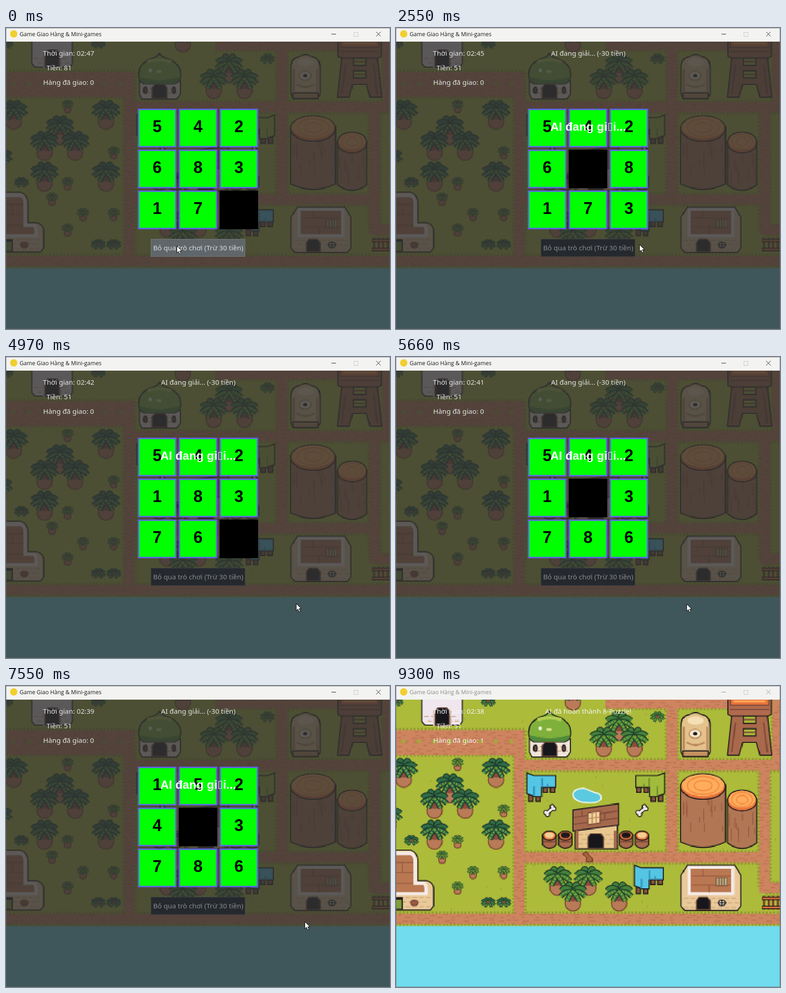
Animation of 846x662 px, one loop 9.32 s. Source, as an HTML page with a canvas:

```html
<!DOCTYPE html>
<html lang="vi">
<head>
<meta charset="utf-8">
<style>
html, body { margin: 0; width: 100%; height: 100%; overflow: hidden; }
canvas { display: block; }
</style>
</head>
<body>
<canvas id="stage" width="846" height="662"></canvas>
<script>
const LOOP = 9320, PIXEL = 2.115, TOP = 30, TILE = 33.9;
const INK = '#1b171b', DARK = '#17171b', BROWN = '#a9694b', PLANK = '#7d4938';
const ctx = document.getElementById('stage').getContext('2d');

// ---- Village map, painted small and enlarged for chunky pixels ----
const map = document.createElement('canvas');
map.width = 400;
map.height = 299;
const g = map.getContext('2d');
g.setTransform(1 / PIXEL, 0, 0, 1 / PIXEL, 0, -TOP / PIXEL);

let seed = 7;
const random = () => (seed = seed * 16807 % 2147483647) / 2147483647;

function shape(d, fill, ink = INK, width = 2.4) {
  const path = new Path2D(d);
  if (fill) { g.fillStyle = fill; g.fill(path); }
  if (ink) { g.strokeStyle = ink; g.lineWidth = width; g.stroke(path); }
}
function rect(fill, x, y, w, h) {
  g.fillStyle = fill;
  g.fillRect(x, y, w, h);
}
function oval(fill, x, y, rx, ry, ink) {
  g.beginPath();
  g.ellipse(x, y, rx, ry, 0, 0, 7);
  if (fill) { g.fillStyle = fill; g.fill(); }
  if (ink) { g.strokeStyle = ink; g.lineWidth = 2.4; g.stroke(); }
}

function ground() {
  const roads = 'M272 98V525M272 174H860M608 38V377M272 377H812M812 174V444H860M-9 512H860M462 38H740M841 20V174';
  const avenue = 'M-9 124H283';
  shape(roads, null, '#cd845f', 23);
  shape(avenue, null, '#cd845f', 55);
  g.globalCompositeOperation = 'source-atop';
  for (let y = 34; y < 528; y += 6)
    for (let x = random() * 20; x < 846; x += 14 + random() * 22)
      rect('#b97050', x, y + (random() < .5 ? 0 : 2), 6 + random() * 8, 2);
  g.globalCompositeOperation = 'destination-over';
  g.setLineDash([4, 4]);
  shape(roads, null, '#8f962f', 31);
  shape(avenue, null, '#8f962f', 63);
  g.setLineDash([]);
  for (let n = 0; n < 110; n++)
    rect(n % 2 ? '#97a52f' : '#bfae3c', random() * 846, 35 + random() * 485, 2, 5);
  rect('#acbb3a', 0, TOP, 846, 640);
  g.globalCompositeOperation = 'source-over';
  rect('#70dcee', 0, 528, 846, 140);
  for (let x = 16; x < 260; x += 34) shape(`M${x - 6} 122l6 -6l6 6l-6 6z`, '#a3aa38', null);
}

// P: palm, s: sprout, x: fallen leaves
const GARDEN = `
............P
x.....x
...............P.x
..............P.P

.P..s..P
....P
...P.P
P......s
...P...P
.x..s
...s
.....s.s...P.P
....s.......P..P
......xx`;

function plant(x, y, size, green, trunk) {
  if (trunk) {
    oval('#b97b57', x, y + 48 * size, 17 * size, 17 * size, '#7d4632');
    oval('#8f4b3c', x, y + 38 * size, 13 * size, 6 * size);
  }
  for (let i = 0; i < 8; i++) {
    const angle = -Math.PI / 2 + (i >> 1) * .75 + .4, side = i % 2 ? 1 : -1;
    const dx = side * 29 * Math.cos(angle) * size, dy = (18 * Math.sin(angle) + 5) * size;
    const frond = `M${x} ${y + 22 * size}q${dx * .6} ${dy - 13 * size} ${dx} ${dy}`;
    shape(frond, null, '#1d3329', 12 * size);
    shape(frond, null, green, 8 * size);
    g.setLineDash([3, 4]);
    if (i > 3) shape(frond, null, '#8fb13c', 4 * size);
    g.setLineDash([]);
  }
  if (!trunk) oval('#8a4a38', x, y + 22 * size, 4, 3);
}

function garden() {
  GARDEN.split('\n').slice(1).forEach((row, r) => [...row].forEach((kind, c) => {
    const y = 34 * r - 12, green = c < 9 ? '#2f6b45' : '#42803a';
    if (kind === 'P') plant(TILE * (c - .5), y, 1, green, true);
    if (kind === 's') plant(TILE * c, y, .43, '#5f9038', true);
    if (kind === 'x') plant(TILE * c, y, .52, green, false);
  }));
}

function doorway(x, y, w, h) {
  shape(`M${x} ${y + h}v${8 - h}l6 -8h${w - 12}l6 8v${h - 8}z`, DARK, '#6b4636');
}

function bricks(x, y, w, h) {
  for (let row = 0; row * 10 < h; row++)
    for (let i = row % 2 * 7; i < w - 5; i += 15) rect('#cda476', x + i, y + row * 10, 10, 2);
}

function stump(x, y, w, ry, bottom) {
  const rx = w / 2, cx = x + rx;
  shape(`M${x} ${y}V${bottom - 12}Q${cx} ${bottom + 12} ${x + w} ${bottom - 12}V${y}Z`, '#b17754');
  for (let i = 0; i < w / 7; i++)
    rect('#96593f', x + 3 + random() * (w - 8), y + ry + random() * (bottom - y - ry - 40), 2, 8 + random() * 22);
  oval('#e8743c', cx, y + 2, rx, ry, INK);
  oval('#ffad5a', cx, y - 1, rx - 3, ry - 4);
  for (const s of [.7, .4]) oval(null, cx, y, rx * s, ry * s, '#ef8744');
}

function barrel(x, inside) {
  shape(`M${x - 15} 328V350Q${x} 364 ${x + 15} 350V328Z`, BROWN);
  rect(PLANK, x - 14, 341, 28, 3);
  oval('#e8743c', x, 329, 15, 10, INK);
  oval(inside, x, 328, 10, 6);
}

function tarp(x, y, side, color, shade) {
  g.save();
  g.translate(x, y);
  g.scale(side, 1);
  for (let leg = 4; leg < 60; leg += 16) shape(`M${leg} 28h10v${leg < 30 ? 35 : 15}h-10z`, '#8a5540');
  shape('M0 0L16 6H64V32H33V52H18L0 46Z', color);
  shape('M16 30V50M34 12V32M46 24V32', null, shade, 3);
  g.restore();
}

function bone(x, y) {
  for (const [color, grow] of [[INK, 2], ['#f4eee8', 0]]) {
    shape(`M${x - 7} ${y + 7}L${x + 7} ${y - 6}`, null, color, 5 + 2 * grow);
    for (const s of [-1, 1]) {
      oval(color, x + 9 * s, y - 4 * s, 3.5 + grow, 3.5 + grow);
      oval(color, x + 5 * s, y - 9 * s, 3.5 + grow, 3.5 + grow);
    }
  }
}

function whiteTower() {
  shape('M57 20V78L64 86H140L146 78V20Z', '#f0e6ee');
  bricks(62, 66, 80, 20);
  shape('M82 88V54Q102 38 122 54V88', '#d9c8bc', null);
  doorway(86, 48, 32, 39);
}

function domeHut() {
  shape('M294 116H384V146L376 156H300L294 146Z', '#f0e4d8');
  bricks(302, 132, 76, 20);
  shape('M292 104Q292 78 318 68Q332 64 338 56Q344 64 358 68Q385 78 385 104Q385 118 372 123H304Q292 118 292 104Z', '#7fb03c');
  shape('M294 108Q338 122 383 108Q382 122 366 122H308Q296 122 294 108Z', '#4f8a3a', null);
  shape('M312 74Q338 66 364 74', null, '#b5cf50', 7);
  oval('#f6fbe6', 318, 93, 4, 4);
  oval('#d7e38a', 337, 96, 6, 3);
  doorway(322, 124, 33, 30);
  for (const x of [307, 370]) oval('#6b4636', x, 137, 4, 7, INK);
}

function statue() {
  shape('M628 92Q626 66 646 63Q660 54 674 63Q694 66 692 92V146L686 155H634L628 146Z', '#e4c28c');
  shape('M634 90V140M686 90V140M640 124Q660 136 680 124', null, '#b98658', 4);
  oval('#f5dfb4', 660, 76, 18, 9);
  oval('#f8ead0', 659, 105, 13, 10, '#b98658');
  oval(INK, 659, 105, 5, 4);
  shape('M632 143H688V155H632Z', '#c4915f');
}

function watchTower() {
  shape('M740 64L730 152H756L764 124H794L802 152H828L818 64Z', BROWN);
  shape('M765 66H793V82H765ZM765 94H793V110H765Z', '#acbb3a');
  shape('M748 80L740 146M810 80L818 146M765 74H793M765 102H793', null, PLANK, 3);
  shape('M731 20H827V62L820 66H738L731 62Z', '#b06a4c');
  shape('M737 20H821V42H737Z', '#e8743c', PLANK);
  rect('#ffad5a', 744, 32, 70, 4);
  shape('M736 52H822', null, PLANK, 3);
}

function yard() {
  shape('M395 300H488V358H395Z', '#e9c78f');
  bricks(402, 326, 82, 30);
  shape('M390 273L490 259V306L390 319Z', '#a4694c');
  shape('M392 289L488 275M392 304L488 291M410 272V286M460 280V292', null, PLANK);
  shape('M423 279L450 275V301L423 305Z', '#f0d29b', PLANK);
  shape('M432 278V303M441 277V302M423 292L450 288', null, '#b98658', 2);
  for (const x of [395, 480]) rect('#a4694c', x, 318, 7, 39);
  doorway(423, 325, 34, 32);
  for (const x of [338, 542]) barrel(x, '#f3cf94');
  for (const x of [373, 507]) barrel(x, INK);
  shape('M390 238Q392 224 414 225Q428 230 436 234Q454 236 452 248Q448 258 424 257Q392 256 390 238Z', '#5bc9e0', '#eef4ee', 3);
  for (const x of [339, 542]) bone(x, 274);
  tarp(288, 191, 1, '#55c5e4', '#2f8fb8');
  tarp(592, 191, -1, '#a3bb3c', '#66892f');
  tarp(525, 394, 1, '#55c5e4', '#2f8fb8');
}

function clayHouse(wall, roof, planks) {
  shape(wall, '#e9c99a');
  shape(roof, '#b97852', '#f5ece8', 7);
  shape(planks, null, '#96593f', 2);
}

function clayHouses() {
  clayHouse('M628 416L642 394H746L760 416V484L752 494H636L628 484Z', 'M646 399H742V457H646Z',
    'M652 418H738M652 438H738M676 403V418M690 438V454');
  bricks(634, 466, 120, 26);
  doorway(662, 464, 30, 28);
  rect('#8a5a40', 704, 421, 26, 20);
  for (let x = 707; x < 728; x += 6) rect('#b6bc92', x, 423, 3, 15);
  oval('#d8d8c0', 718, 477, 8, 6, INK);
  shape('M718 471V483M710 477H726', null, INK, 2);

  clayHouse('M-6 361H32Q48 366 48 384V428H68Q83 432 83 446V484L76 493H-6Z',
    'M-9 368H32Q42 372 42 384V434H62Q68 438 66 457H-9Z', 'M0 388H38M0 410H38M0 434H38M14 388V410');
  bricks(6, 464, 72, 28);
  rect(INK, 0, 464, 15, 28);
  rect('#7fa038', 0, 470, 12, 20);
  oval('#96593f', 40, 477, 8, 6, PLANK);
}

function ladder() {
  for (let x = 811; x < 846; x += 10) shape(`M${x} 462v30`, null, '#7d3d2c', 5);
  shape('M806 467H850M806 487H850', null, INK, 8);
  shape('M807 467H850M807 487H850', null, '#e8743c', 4);
}

function paintMap() {
  ground();
  garden();
  whiteTower();
  domeHut();
  statue();
  watchTower();
  stump(627, 219, 99, 28, 355);
  stump(730, 250, 65, 23, 357);
  yard();
  clayHouses();
  ladder();
  shape('M412 370L415 366H422L424 371Q434 376 433 387H419L420 377Z', '#a8643c', '#5e3524', 2);
}

// ---- Timeline ----
const CLICK = 1220, SOLVE = 2150, MOVE = 390, DONE = 8880, BLUR = 9300;
const START = '542683170', PATH = 'ULLDRURDLUULDRURDD';
const STEP = { U: -3, D: 3, L: -1, R: 1 };
// Resting points of the pointer: time, x, y
const REST = [
  [0, 376, 479], [1220, 377, 483], [1760, 536, 476], [3600, 536, 476], [3870, 539, 465],
  [4500, 539, 465], [4970, 639, 542], [6060, 641, 543], [6600, 657, 520], [7550, 658, 518], [8250, 805, 700]
];

function boardAt(t) {
  const board = [...START];
  let blank = board.indexOf('0');
  for (const move of PATH.slice(0, Math.max(0, Math.floor((t - SOLVE) / MOVE) + 1))) {
    const next = blank + STEP[move];
    [board[blank], board[next]] = [board[next], '0'];
    blank = next;
  }
  return board;
}

function pointerAt(t) {
  const i = REST.findLastIndex(p => p[0] <= t);
  const [t0, x0, y0] = REST[i], [t1, x1, y1] = REST[i + 1] || [LOOP, x0, y0];
  const p = (t - t0) / (t1 - t0), ease = p * p * (3 - 2 * p);
  return [Math.round(x0 + (x1 - x0) * ease), Math.round(y0 + (y1 - y0) * ease)];
}

// ---- Screen ----
const UI = '15.2px "Noto Sans", sans-serif';
const bold = size => `bold ${size}px "Liberation Sans", sans-serif`;

function text(str, x, y, font, color, align = 'center') {
  ctx.font = font;
  ctx.fillStyle = color;
  ctx.textAlign = align;
  ctx.fillText(str, x, y);
}
function box(fill, x, y, w, h) {
  ctx.fillStyle = fill;
  ctx.fillRect(x, y, w, h);
}
function frameBox(color, x, y, w, h) {
  ctx.lineWidth = 1;
  ctx.strokeStyle = color;
  ctx.strokeRect(x + .5, y + .5, w - 1, h - 1);
}

function titleBar(active) {
  const color = active ? '#1b1b1b' : '#8d8d8d';
  box('#f3f3f1', 0, 0, 846, TOP);
  ctx.fillStyle = '#f2cf2e';
  ctx.beginPath();
  ctx.arc(17, 13, 8, 0, 7);
  ctx.fill();
  text('Game Giao Hàng & Mini-games', 30, 18, '12.4px "Open Sans", sans-serif', color, 'left');
  frameBox('#c6c6c6', 766, 9, 10, 10);
  ctx.strokeStyle = color;
  ctx.stroke(new Path2D('M717 13.5H727M815.5 8.5L825.5 18.5M825.5 8.5L815.5 18.5'));
}

function puzzle(t) {
  boardAt(t).forEach((digit, i) => {
    const x = 290.5 + i % 3 * 90, y = 177.5 + Math.floor(i / 3) * 90;
    box(digit === '0' ? '#000' : '#6262ee', x, y, 85, 85);
    if (digit === '0') return;
    box('#0f0', x + 3, y + 3, 79, 79);
    text(digit, x + 42.5, y + 51.5, bold(36), '#000');
  });
}

function skipButton(enabled) {
  box(enabled ? '#5f676b' : '#25292e', 319, 464, 208, 39);
  frameBox(enabled ? '#747c80' : '#363c41', 319, 464, 208, 39);
  text('Bỏ qua trò chơi (Trừ 30 tiền)', 423.5, 489, UI, enabled ? '#dcdcdc' : '#868b8d');
}

// The banner font has no "ả", so an empty box stands in for it.
function banner() {
  text('AI đang gi', 340, 226, bold(26), '#fff', 'left');
  text('i...', 478, 226, bold(26), '#fff', 'left');
  frameBox('#fff', 468, 209, 8, 17);
}

function pointer(t) {
  const arrow = new Path2D('M.5 .5V16L4 12.5L6.8 18.5L9.4 17.3L6.8 11.5H11.5Z');
  ctx.save();
  ctx.translate(...pointerAt(t));
  ctx.fillStyle = '#fff';
  ctx.fill(arrow);
  ctx.strokeStyle = '#000';
  ctx.stroke(arrow);
  ctx.restore();
}

function draw(t) {
  const clicked = t >= CLICK, done = t >= DONE;
  const seconds = 47 - Math.max(0, Math.min(9, Math.floor((t - 690) / 977.5) + 1));
  const hud = (str, x, y) => text(str, x, y, UI, done ? '#f4f4f4' : '#e4e4e4');
  ctx.imageSmoothingEnabled = false;
  ctx.drawImage(map, 0, TOP, 846, map.height * PIXEL);
  if (!done) {
    box('rgba(50, 50, 50, .784)', 0, TOP, 846, 632);
    puzzle(t);
    if (clicked) banner();
    skipButton(!clicked);
  }
  hud('Thời gian: 02:' + seconds, 138, 61);
  hud('Tiền: ' + (clicked ? 51 : 81), 117, 93);
  hud('Hàng đã giao: ' + (done ? 1 : 0), 138, 125);
  if (clicked) hud(done ? 'AI đã hoàn thành 8-Puzzle!' : 'AI đang giải... (-30 tiền)', 423.5, 61);
  titleBar(t < BLUR);
  pointer(t);
  frameBox('rgba(100, 100, 100, .6)', 0, 0, 846, 662);
}

paintMap();
(function frame() {
  draw(performance.now() % LOOP);
  requestAnimationFrame(frame);
})();
</script>
</body>
</html>
```
